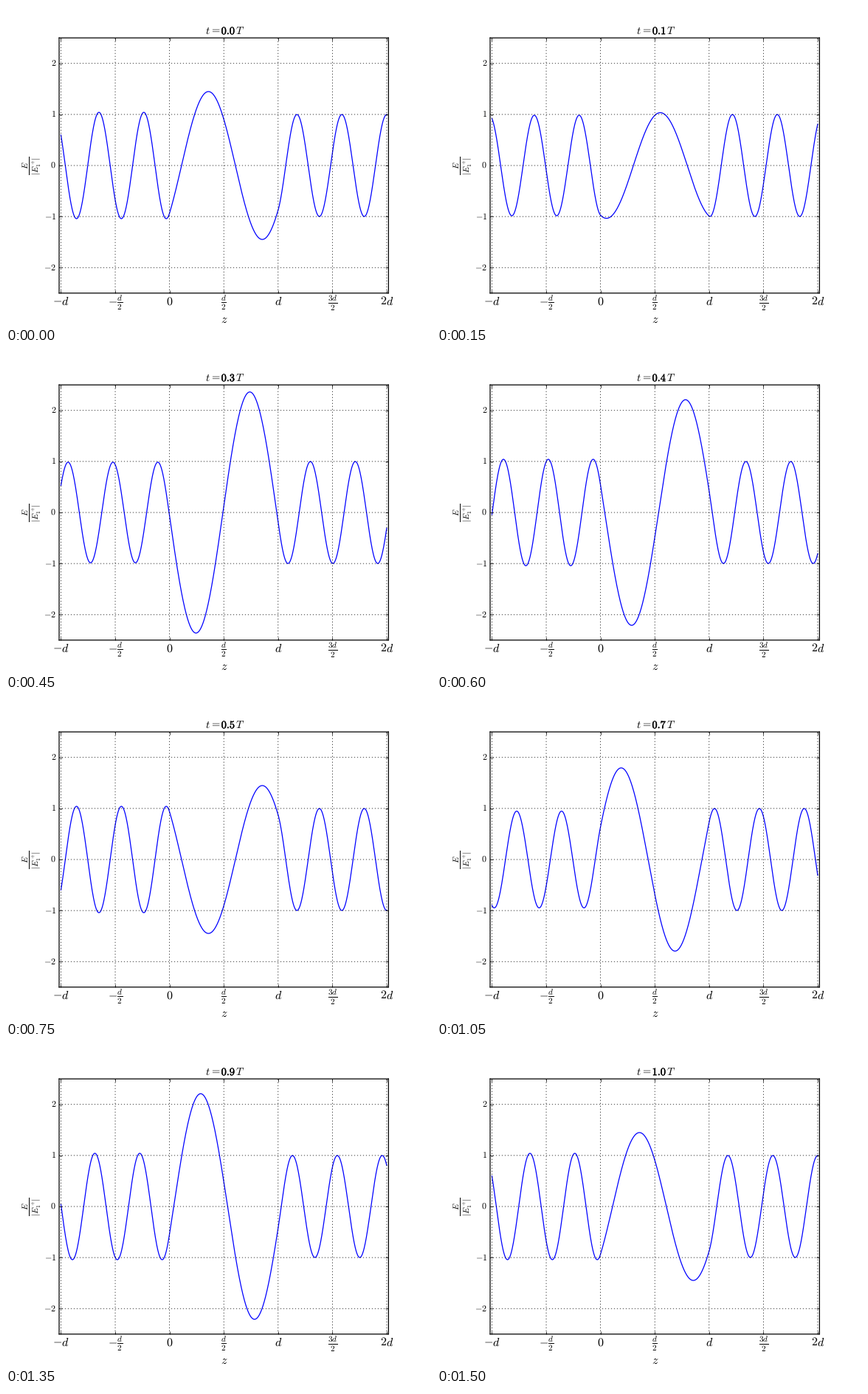
Write a matplotlib script that moves like this. It is 576x432 px and loops after 1.65 s.

```python
import matplotlib.pyplot as plt
import numpy as np
from matplotlib.animation import FuncAnimation
from matplotlib.patheffects import withStroke

WIDTH, HEIGHT, DPI = 576, 432, 72
STEPS = 11            # 0.0 T to 1.0 T in tenths of a period
INDEX = 2.4           # refractive index outside the slab, 1 inside
LENGTH = 2.42         # slab thickness in outer wavelengths
THIN, THICK = 0.75, 1.25

plt.rcParams.update({
    "mathtext.fontset": "cm",
    "text.hinting": "no_hinting",
    "lines.scale_dashes": False,
    "axes.linewidth": THICK,
    "axes.axisbelow": False,
})


def complex_field(z):
    """Field of a wave crossing a slab on 0 < z < 1, without the time factor."""
    k_out = 2 * np.pi * LENGTH
    k_in = k_out / INDEX
    mismatch = (INDEX**2 - 1) / (2 * INDEX) * np.sin(k_in)
    sent = np.exp(-1j * k_out) / np.hypot(1, mismatch)

    after = sent * np.exp(1j * k_out * (z - 1))
    inside = sent * (np.cos(k_in * (z - 1)) + 1j * INDEX * np.sin(k_in * (z - 1)))
    value = sent * (np.cos(k_in) - 1j * INDEX * np.sin(k_in))
    slope = sent * (np.sin(k_in) / INDEX + 1j * np.cos(k_in))
    before = value * np.cos(k_out * z) + slope * np.sin(k_out * z)
    return np.where(z < 0, before, np.where(z < 1, inside, after))


def put_text(x, y, text, size, va="baseline", **kwargs):
    """Place text at pixel coordinates counted from the top left."""
    return fig.text(x / WIDTH, 1 - y / HEIGHT, text, fontsize=size, va=va, **kwargs)


fig = plt.figure(figsize=(WIDTH / DPI, HEIGHT / DPI), dpi=DPI, facecolor="white")
ax = fig.add_axes([0.125, 0.1, 0.775, 0.8])
ax.set_xlim(-1 - 1 / 60, 2 + 1 / 60)
ax.set_ylim(-2.5, 2.5)
ax.set_xticks(
    np.arange(-1, 2.1, 0.5),
    ["$-d$", r"$-\frac{d}{2}$", "$0$", r"$\frac{d}{2}$", "$d$",
     r"$\frac{3d}{2}$", "$2d$"],
    va="baseline",
)
ax.set_yticks(range(-2, 3), [f"${n}$" for n in range(-2, 3)], va="center")
ax.tick_params(direction="in", length=4, width=THIN, top=True, right=True)
ax.tick_params(axis="x", labelsize=16, pad=16.5)
ax.tick_params(axis="y", labelsize=12, pad=4)
ax.grid(True, color="black", linestyle=(0.125, (1.25, 2.75)), linewidth=THIN)

# Lines keep their exact subpixel places.
for spine in ax.spines.values():
    spine.set_snap(False)
for tick in ax.xaxis.get_major_ticks() + ax.yaxis.get_major_ticks():
    for line in (tick.gridline, tick.tick1line, tick.tick2line):
        line.set_snap(False)

put_text(296, 429, "$z$", 16, ha="center")
put_text(34.3, 216, r"$\frac{E}{|E_1^+\hspace{-0.2}|}$", 16, ha="center",
         va="center", rotation=90)
put_text(270.4, 38.2, r"$t\hspace{0.078}=$", 14.4, ha="left")
put_text(311.3, 38.2, "$T$", 14.4, ha="left")
clock = put_text(301.5, 38.2, "", 14.4, ha="center",
                 path_effects=[withStroke(linewidth=0.4, foreground="black")])

z = np.linspace(-1, 2, 1201)
field = complex_field(z)
wave, = ax.plot(z, field.real, color="#0000ff", linewidth=THICK)


def draw(step):
    t = step / 10
    wave.set_ydata((field * np.exp(-2j * np.pi * t)).real)
    clock.set_text(rf"$\mathbf{{{t:.1f}}}$")
    return wave, clock


animation = FuncAnimation(fig, draw, frames=STEPS, interval=150, repeat=True,
                          repeat_delay=0)
plt.show()
```
